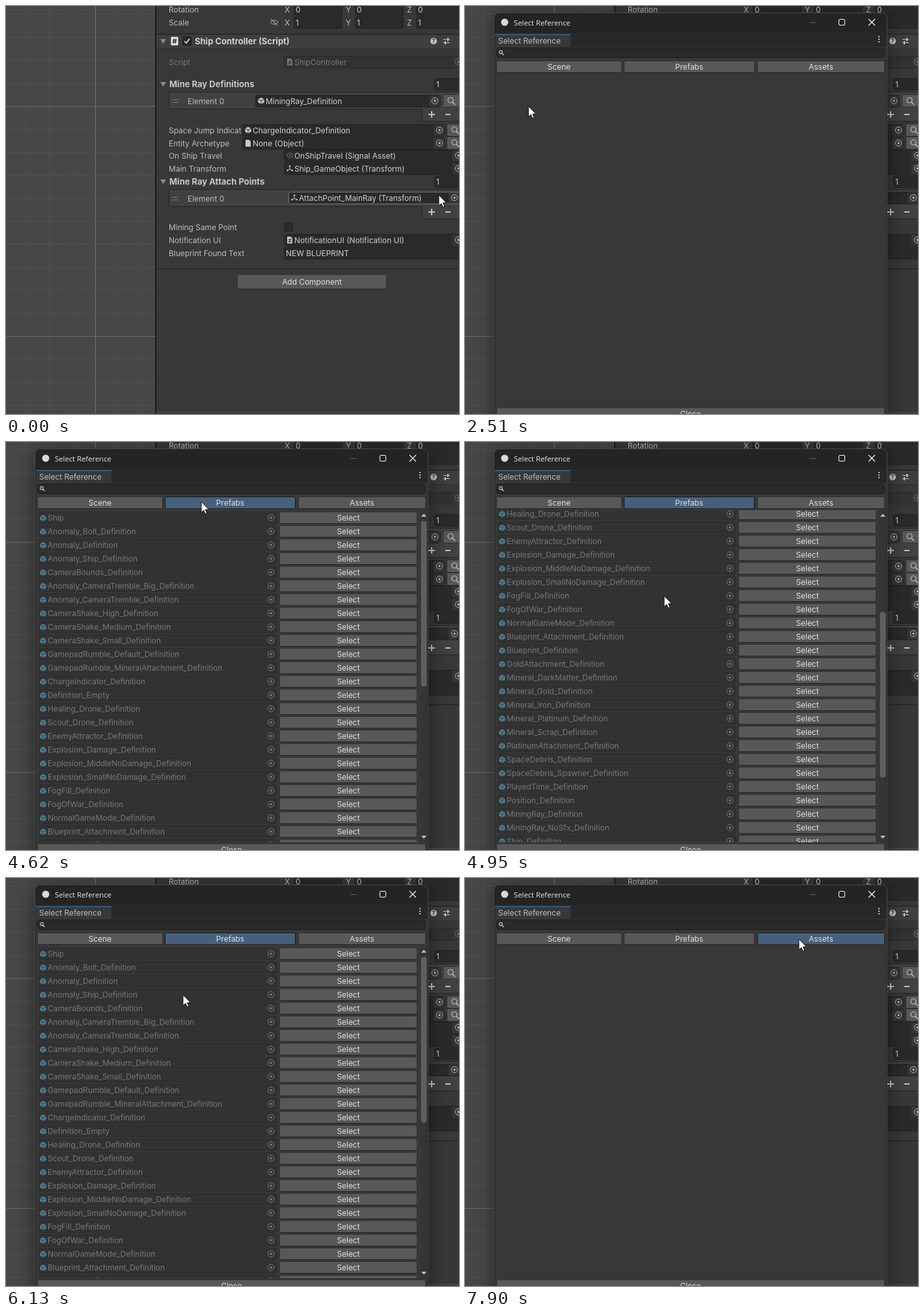
These frames come from a looping animation (696x628 px, 8000 ms). An HTML page with a canvas:

```html
<!DOCTYPE html>
<html lang="en">
<head>
<meta charset="utf-8">
<title>Reference picker</title>
<style>
  html, body { margin: 0; width: 100%; height: 100%; overflow: hidden; background: #383838; }
  canvas { display: block; }
</style>
</head>
<body>
<canvas id="stage" width="696" height="628"></canvas>
<script>
const ctx = document.getElementById('stage').getContext('2d');
const LOOP = 8000;
const FONT = '11.92px Inter, sans-serif';
const BOLD = '700 13px Inter, sans-serif';
const PANEL = '#383838', FIELD = '#2a2a2a', EDGE = '#212121', BUTTON = '#585858';
const HOVER = '#676767', ACTIVE = '#46607c', LABEL = '#bcbcbc', VALUE = '#d0d0d0', DIM = '#787878';

const OPEN_AT = 1690, READY_AT = 1780, HOVER_FROM = 3450;
const SCENE_AT = 3650, PREFABS_AT = 4060, ASSETS_AT = 7300;
const ROW = 21, LIST_TOP = 105, LIST_BOTTOM = 616, MAX_SCROLL = 478;

const prefabs = `Ship Anomaly_Bolt_ Anomaly_ Anomaly_Ship_ CameraBounds_ Anomaly_CameraTremble_Big_
  Anomaly_CameraTremble_ CameraShake_High_ CameraShake_Medium_ CameraShake_Small_ GamepadRumble_Default_
  GamepadRumble_MineralAttachment_ ChargeIndicator_ Definition_Empty Healing_Drone_ Scout_Drone_
  EnemyAttractor_ Explosion_Damage_ Explosion_MiddleNoDamage_ Explosion_SmallNoDamage_ FogFill_ FogOfWar_
  NormalGameMode_ Blueprint_Attachment_ Blueprint_ GoldAttachment_ Mineral_DarkMatter_ Mineral_Gold_
  Mineral_Iron_ Mineral_Platinum_ Mineral_Scrap_ PlatinumAttachment_ SpaceDebris_ SpaceDebris_Spawner_
  PlayedTime_ Position_ MiningRay_ MiningRay_NoSfx_ Ship_ Ship_GameObject Terrain_ TerrainGrid_
  TerrainHole_ TerrainSpawnPosition_ GameHud_ Vision_ WorldBounds_`
  .split(/\s+/).map(name => name.replace(/_$/, '_Definition'));
const sceneObjects = prefabs.slice(0, 18).map(name => name.replace('_Definition', ''));

// [time, x, y] of the pointer tip
const pointerPath = [
  [30, 665, 291], [420, 687, 210], [2050, 687, 210], [2600, 53, 150], [2830, 127, 120], [2900, 127, 120],
  [3020, 204, 91], [3450, 204, 91], [3600, 221, 93], [3650, 221, 93], [3860, 300, 92], [4620, 300, 92],
  [4800, 306, 237], [4950, 306, 237], [5140, 301, 245], [5740, 301, 245], [6130, 272, 180],
  [6270, 273, 172], [6500, 273, 172], [6660, 300, 68], [6830, 300, 68], [7180, 520, 93],
  [7380, 520, 93], [7630, 446, 92], [7660, 446, 92], [7870, 513, 94]
];
// each wheel notch scrolls 60 px
const wheelDown = [4830, 4860, 4890, 4920, 4950, 5080, 5140, 5340];
const wheelUp = [5800, 5840, 5880, 5920, 5970, 6010, 6050, 6100];

function pointerAt(t) {
  const next = pointerPath.findIndex(p => p[0] > t);
  if (next === 0) return { x: pointerPath[0][1], y: pointerPath[0][2] };
  const a = pointerPath.at(next < 0 ? -1 : next - 1), b = pointerPath.at(next);
  const u = next < 0 ? 0 : (t - a[0]) / (b[0] - a[0]), k = u * u * (3 - 2 * u);
  return { x: a[1] + (b[1] - a[1]) * k, y: a[2] + (b[2] - a[2]) * k };
}

function scrollAt(t) {
  const notches = times => times.filter(time => time <= t).length;
  const down = Math.min(MAX_SCROLL, notches(wheelDown) * 60);
  return Math.max(0, down - notches(wheelUp) * 60);
}

const inside = (p, x, y, w, h) => p.x >= x && p.x < x + w && p.y >= y && p.y < y + h;

function rect(x, y, w, h, color) {
  ctx.fillStyle = color;
  ctx.fillRect(x, y, w, h);
}

function box(x, y, w, h, fill, stroke, radius = 2) {
  ctx.beginPath();
  ctx.roundRect(x + .5, y + .5, w - 1, h - 1, radius);
  ctx.fillStyle = fill;
  ctx.fill();
  if (stroke) {
    ctx.strokeStyle = stroke;
    ctx.lineWidth = 1;
    ctx.stroke();
  }
}

function text(str, x, y, color = LABEL, font = FONT, align = 'left') {
  ctx.font = font;
  ctx.textAlign = align;
  ctx.fillStyle = color;
  ctx.fillText(str, x, y + 5);
}

// Polyline through a flat list of coordinates
function line(points, color, width = 1, fill) {
  ctx.beginPath();
  for (let i = 0; i < points.length; i += 2) ctx.lineTo(points[i], points[i + 1]);
  if (fill) {
    ctx.closePath();
    ctx.fillStyle = fill;
    ctx.fill();
  }
  if (color) {
    ctx.strokeStyle = color;
    ctx.lineWidth = width;
    ctx.stroke();
  }
}

function circle(x, y, r, fill, stroke, width = 1) {
  ctx.beginPath();
  ctx.arc(x, y, r, 0, Math.PI * 2);
  if (fill) { ctx.fillStyle = fill; ctx.fill(); }
  if (stroke) { ctx.strokeStyle = stroke; ctx.lineWidth = width; ctx.stroke(); }
}

function clipped(x, y, w, h, draw) {
  ctx.save();
  ctx.beginPath();
  ctx.rect(x, y, w, h);
  ctx.clip();
  draw();
  ctx.restore();
}

function button(label, x, y, w, h, fill = BUTTON) {
  box(x, y, w, h, fill, fill === ACTIVE ? '#161616' : '#303030');
  rect(x + 2, y + h - 1, w - 4, 1, '#242424');
  text(label, x + w / 2, Math.floor(y + h / 2), '#e0e0e0', FONT, 'center');
}

function magnifier(x, y, r = 4, color = '#c4c4c4') {
  circle(x - 1, y - 1, r, null, color, 1.2);
  line([x - 1 + r * .7, y - 1 + r * .7, x + r * 1.5, y + r * 1.5], color, 1.4);
}

function picker(x, y, color = '#b4b4b4') {
  circle(x, y, 4.7, null, color);
  circle(x, y, 1.7, color);
}

function foldout(y) {
  line([237, y - 3, 246, y - 3, 241.5, y + 4], null, 0, '#8a8a8a');
}

const icons = {
  cube(x, y, color, seam = FIELD) {
    line([x, y - 5, x + 4.7, y - 2.6, x + 4.7, y + 2.6, x, y + 5, x - 4.7, y + 2.6, x - 4.7, y - 2.6], null, 0, color);
    line([x - 4.7, y - 2.6, x, y - .2, x + 4.7, y - 2.6], seam);
    line([x, y, x, y + 5], seam);
  },
  outline(x, y) {
    line([x, y - 4, x + 4, y - 2, x + 4, y + 2, x, y + 4, x - 4, y + 2, x - 4, y - 2, x, y - 4], '#707070');
    circle(x, y, 1.2, '#707070');
  },
  page(x, y, color) {
    line([x - 4, y - 5, x + 1.5, y - 5, x + 4, y - 2.5, x + 4, y + 5.5, x - 4, y + 5.5], null, 0, color);
  },
  script(x, y, color) {
    icons.page(x, y, color);
    text('#', x, y - 1, '#333', '700 8px Inter, sans-serif', 'center');
  },
  axes(x, y, color) {
    line([x, y - 3, x, y + 1, x - 3.5, y + 3], color);
    line([x, y + 1, x + 3.5, y + 3], color);
    circle(x, y - 3.5, 1.3, color);
    circle(x - 3.5, y + 3, 1.3, color);
    circle(x + 3.5, y + 3, 1.3, color);
  }
};

function objectField(x, y, right, icon, label, pickerX, pointer, dim) {
  const hot = !dim && inside(pointer, x, y - 9, pickerX - 9 - x, 18);
  const color = dim ? '#777' : '#c8c8c8';
  box(x, y - 9, right - x, 19, dim ? '#323232' : FIELD, dim ? '#2a2a2a' : EDGE, 3);
  if (hot) box(x, y - 9, right - x + 4, 19, FIELD, '#707070', 3);
  rect(pickerX - 9, y - 8, 17, 17, '#363636');
  icons[icon](x + 9, y, color);
  text(label, x + 16, y, dim ? DIM : VALUE);
  picker(pickerX, y, dim ? '#707070' : undefined);
}

function searchButton(x, y, fill) {
  box(x, y - 10, 40, 20, fill, '#303030');
  magnifier(x + 13, y);
}

function arrayElement(y) {
  box(250, y - 14, 460, 27, '#414141', '#242424', 3);
  box(639, y + 11, 70, 21, '#414141', '#242424', 3);
  rect(640, y + 10, 60, 3, '#414141');
  rect(255, y - 2, 10, 1, '#777');
  rect(255, y + 2, 10, 1, '#777');
  text('Element 0', 279, y);
  rect(649, y + 20, 10, 2, '#c4c4c4');
  rect(653, y + 16, 2, 10, '#c4c4c4');
  rect(675, y + 20, 8, 2, '#c4c4c4');
}

function arrayHeader(label, y) {
  foldout(y);
  text(label, 251, y, '#c8c8c8', BOLD);
  box(658, y - 9, 50, 19, FIELD, EDGE, 3);
  text('1', 661, y, VALUE);
}

function drawGrid() {
  rect(0, 0, 230, 628, '#474747');
  for (let i = -4; i <= 13; i++) {
    const major = i % 10 === 0;
    rect(0, Math.round(154 + i * 35.4), 230, 1, major ? '#6c6c6c' : '#505050');
    if (i > -4 && i < 3) rect(Math.round(136.5 + i * 35.4), 0, 1, 628, i === 0 ? '#727272' : '#505050');
  }
}

function drawVector(label, value, y) {
  text(label, 250, y);
  [428, 522, 616].forEach((x, i) => {
    text('XYZ'[i], x, y);
    box(x + 14, y - 9, 75, 19, FIELD, EDGE, 3);
    text(value, x + 17, y, VALUE);
  });
}

function drawHeader() {
  rect(231, 43, 465, 1, '#1c1c1c');
  rect(231, 44, 465, 21, '#3e3e3e');
  rect(231, 65, 465, 1, '#303030');
  foldout(54);
  box(253, 47, 12, 14, '#e6e6e6', null, 1);
  text('#', 259, 53, '#222', '700 11px Inter, sans-serif', 'center');
  box(271, 47, 14, 14, FIELD, '#161616', 2);
  line([274, 54, 277, 57, 282, 50.5], '#ddd', 1.7);
  text('Ship Controller (Script)', 290, 54, '#d2d2d2', BOLD);
  circle(657, 54, 5, '#c4c4c4');
  text('?', 657, 52, '#333', '700 9px Inter, sans-serif', 'center');
  rect(672, 51, 10, 1, '#c4c4c4');
  rect(672, 56, 10, 1, '#c4c4c4');
  rect(678, 49, 2, 5, '#c4c4c4');
  rect(674, 54, 2, 5, '#c4c4c4');
}

function drawInspector(t, pointer) {
  rect(229, 0, 2, 628, '#1c1c1c');
  rect(231, 0, 465, 628, PANEL);
  drawVector('Rotation', '0', 5);
  drawVector('Scale', '1', 25);
  ctx.beginPath();
  ctx.ellipse(412, 25, 5.5, 3, 0, 0, Math.PI * 2);
  ctx.strokeStyle = '#b4b4b4';
  ctx.lineWidth = 1;
  ctx.stroke();
  line([407, 20, 417, 30], '#c4c4c4');
  drawHeader();

  text('Script', 250, 86, DIM);
  objectField(427, 86, 710, 'script', 'ShipController', 695, pointer, true);

  arrayHeader('Mine Ray Definitions', 120);
  arrayElement(146);
  objectField(383, 146, 668, 'cube', 'MiningRay_Definition', 659, pointer);
  searchButton(671, 146, BUTTON);

  clipped(231, 180, 131, 22, () => text('Space Jump Indicator', 250, 191));
  objectField(363, 191, 675, 'cube', 'ChargeIndicator_Definition', 666, pointer);
  searchButton(677, 191, BUTTON);
  text('Entity Archetype', 250, 211);
  objectField(363, 211, 675, 'page', 'None (Object)', 666, pointer);
  const pressed = t >= OPEN_AT && t < READY_AT;
  const hot = t < OPEN_AT && inside(pointer, 677, 201, 40, 20);
  searchButton(677, 211, pressed ? ACTIVE : hot ? HOVER : BUTTON);

  text('On Ship Travel', 250, 230);
  objectField(427, 230, 710, 'outline', 'OnShipTravel (Signal Asset)', 695, pointer);
  text('Main Transform', 250, 250);
  objectField(427, 250, 710, 'axes', 'Ship_GameObject (Transform)', 695, pointer);

  arrayHeader('Mine Ray Attach Points', 270);
  arrayElement(296);
  objectField(434, 295, 698, 'axes', 'AttachPoint_MainRay (Transform)', 689, pointer);

  text('Mining Same Point', 250, 340);
  box(427, 333, 14, 14, FIELD, EDGE);
  text('Notification UI', 250, 360);
  objectField(427, 360, 710, 'script', 'NotificationUI (Notification UI)', 695, pointer);
  text('Blueprint Found Text', 250, 380);
  box(427, 371, 290, 19, FIELD, EDGE, 3);
  text('NEW BLUEPRINT', 430, 380, VALUE);

  rect(231, 404, 465, 1, '#1f1f1f');
  button('Add Component', 355, 413, 230, 23);
  rect(231, 625, 465, 1, '#565656');
}

function drawList(names, scroll, extra) {
  clipped(45, LIST_TOP, 603, LIST_BOTTOM - LIST_TOP, () => {
    names.forEach((name, i) => {
      const y = 116 + i * ROW - scroll;
      if (y < LIST_TOP - ROW || y > LIST_BOTTOM + ROW) return;
      const pickerX = 407 + extra;
      box(50, y - 9, 367 + extra, 19, '#323232', '#2c2c2c', 3);
      icons.cube(57, y + 1, '#4b7e93', '#2c4650');
      text(name, 64, y, DIM);
      picker(pickerX, y + .5, '#7a7a7a');
      button('Select', 420 + extra, y - 9, 212, 19);
    });
  });
}

function drawScrollbar(scroll) {
  rect(636, LIST_TOP, 11, LIST_BOTTOM - LIST_TOP, '#353535');
  line([638, 115, 642, 110.5, 646, 115], null, 0, '#c4c4c4');
  line([638, 606, 642, 610.5, 646, 606], null, 0, '#c4c4c4');
  box(637, 121 + scroll / MAX_SCROLL * 223, 10, 256, '#5f5f5f', null, 4);
}

function drawContent(t, pointer) {
  rect(46, 41, 601, 22, '#282828');
  rect(46, 43, 116, 20, PANEL);
  rect(46, 43, 116, 2, '#2c5d87');
  text('Select Reference', 51, 53);
  for (const y of [47, 51, 55]) rect(635, y - 1, 2, 2, '#c8c8c8');
  rect(46, 63, 601, 565, PANEL);

  const overSearch = t > HOVER_FROM && inside(pointer, 48, 64, 596, 16);
  box(48, 64, 597, 16, FIELD, overSearch ? '#656565' : '#1c1c1c', 4);
  magnifier(56, 72, 2.3);

  const selected = t >= ASSETS_AT ? 2 : t >= PREFABS_AT ? 1 : t >= SCENE_AT ? 0 : -1;
  [['Scene', 48, 193], ['Prefabs', 244, 201], ['Assets', 449, 196]].forEach(([label, x, w], i) => {
    const hot = t >= HOVER_FROM && inside(pointer, x, 84, w, 19);
    button(label, x, 84, w, 19, i === selected ? ACTIVE : hot ? HOVER : BUTTON);
  });

  if (selected === 0) drawList(sceneObjects, 0, 13);
  if (selected === 1) {
    const scroll = scrollAt(t);
    drawList(prefabs, scroll, 0);
    drawScrollbar(scroll);
  }
  button('Close', 48, 618, 597, 19);
}

function drawWindow(t, pointer) {
  const ready = t >= READY_AT;
  const k = Math.min(1, (t - OPEN_AT + 20) / 60);
  const scale = .92 + .08 * k;
  ctx.save();
  ctx.globalAlpha = k;
  ctx.translate(346, 330);
  ctx.scale(scale, scale);
  ctx.translate(-346, -330);

  ctx.save();
  ctx.shadowColor = 'rgba(0,0,0,.45)';
  ctx.shadowBlur = 32;
  ctx.shadowOffsetY = 4;
  box(44, 10, 605, 660, '#242424', null, 8);
  ctx.restore();
  box(44, 10, 605, 660, '#242424', '#484848', 8);

  circle(61, 25, 5.5, '#d8d8d8');
  if (ready) text('Select Reference', 75, 25, '#e8e8e8', '11.3px "Open Sans", sans-serif');
  rect(529, 25, 10, 1, '#5c5c5c');
  box(574, 20, 10, 10, 'transparent', '#fff', 1.5);
  line([620, 20, 630, 30], '#fff', 1.1);
  line([630, 20, 620, 30], '#fff', 1.1);

  if (ready) drawContent(t, pointer);
  else rect(45, 41, 603, 620, '#fff');
  ctx.restore();
}

function drawPointer({ x, y }) {
  ctx.save();
  ctx.translate(x, y);
  ctx.lineJoin = 'round';
  line([0, 0, 0, 16.5, 3.8, 13, 6.3, 18.5, 8.8, 17.4, 6.4, 12, 11.5, 11.8, 0, 0], '#111', 1, '#fff');
  ctx.restore();
}

function draw(t) {
  const pointer = pointerAt(t);
  drawGrid();
  drawInspector(t, t < OPEN_AT ? pointer : { x: -1, y: -1 });
  if (t >= OPEN_AT) drawWindow(t, pointer);
  drawPointer(pointer);
}

const start = performance.now();
function tick() {
  draw((performance.now() - start) % LOOP);
  requestAnimationFrame(tick);
}
tick();
</script>
</body>
</html>
```
